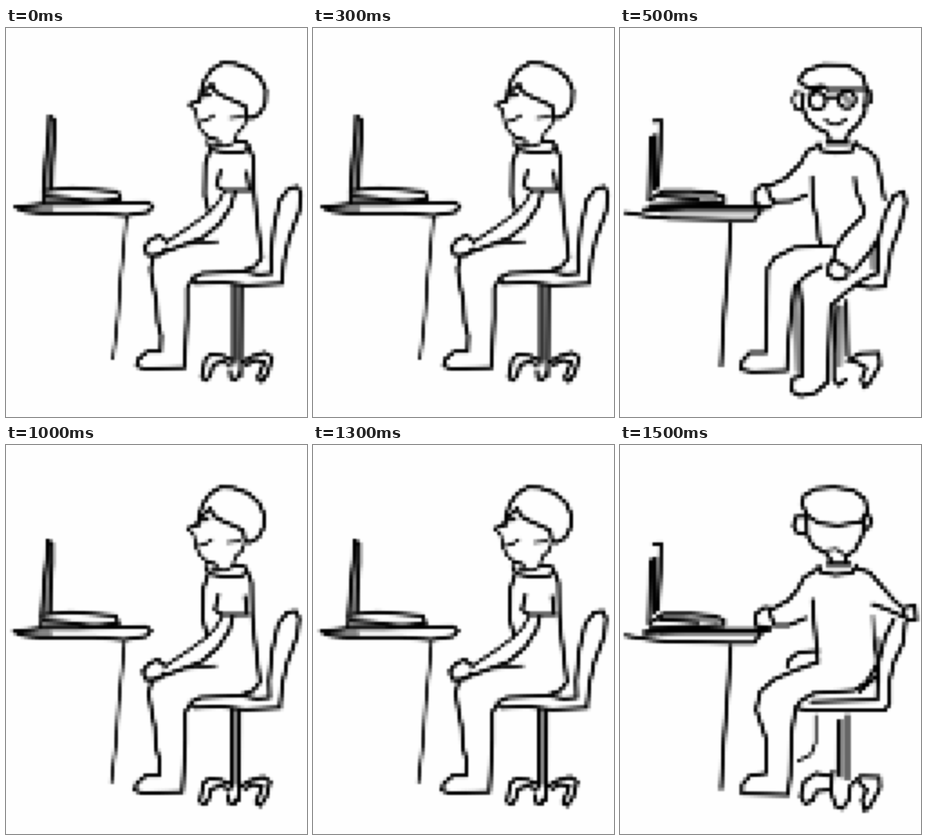
Recreate the animation shown at these times as an HTML page without scripts. Size 500x647 px, loop 2000 ms.

```html
<!DOCTYPE html>
<html lang="en">
<head>
<meta charset="utf-8">
<title>Desk sketch</title>
<style>
  html, body { margin: 0; width: 100%; height: 100%; overflow: hidden; background: #fefefe; }
  svg { display: block; width: 500px; height: 647px; }
  path, circle { fill: none; stroke: #000; stroke-width: 5.6; stroke-linecap: round; stroke-linejoin: round; }
  .thin { stroke-width: 4; }
  .bold { stroke-width: 8; }
  .shade { stroke: #0007; stroke-width: 9; }
  .frame { visibility: hidden; filter: url(#pixelate); animation: show 2s step-end infinite; }
  .second { animation-delay: -1.5s; }
  .third { animation-delay: -1s; }
  .fourth { animation-delay: -.5s; }
  @keyframes show {
    0% { visibility: visible; }
    25%, 100% { visibility: hidden; }
  }
</style>
</head>
<body>
<svg viewBox="0 0 500 647">
  <defs>
    <!-- samples the drawing on a 6px grid, then grows each sample into a cell -->
    <filter id="pixelate" filterUnits="userSpaceOnUse" x="0" y="0" width="500" height="647">
      <feFlood x="2" y="2" width="2" height="2"/>
      <feComposite x="0" y="0" width="6" height="6"/>
      <feTile result="grid"/>
      <feGaussianBlur in="SourceGraphic" stdDeviation="1.3"/>
      <feComposite in2="grid" operator="in"/>
      <feMorphology operator="dilate" radius="2"/>
      <feGaussianBlur stdDeviation=".9"/>
    </filter>

    <g id="resting">
      <g id="side-desk">
        <path class="shade" d="M74 155 69 265M25 301H75M70 286H180"/>
        <path d="M72 147 71 175 66 220 62 275M73 148 80 152 80 185 77 230 76 268"/>
        <path d="M62 271 110 266 185 272 190 284 150 291 105 283 62 280V290"/>
        <path d="M16 298 60 293 120 293 235 290 244 297 236 306 200 312 150 308 60 308 32 305Z"/>
        <path class="thin" d="M200 315 196 360 190 420 186 480 182 515 178 549"/>
      </g>
      <g id="side-head">
        <path d="M322 122 324 105 330 86 342 69 360 58 380 59 405 68 423 84 432 104 431 125 422 142 408 150 400 148"/>
        <path d="M324 108 336 100 342 93 348 106 362 114 385 124 397 130 400 148"/>
        <path d="M305 127 318 122 324 113 338 112"/>
        <path class="thin" d="M305 127 315 137 319 158 325 171 336 181 355 188M318 157 334 153 345 145M372 150 392 148M400 150 395 164 385 173 379 189"/>
        <path d="M336 182 350 186M335 191 340 202 365 207 394 206 405 200 399 190 384 188"/>
        <path class="thin" d="M344 193 365 197 384 189"/>
      </g>
      <g id="side-body">
        <path d="M338 206 331 226 330 278 337 305M405 202 411 216 412 270 416 310 421 350 425 382 414 396 394 404"/>
        <path d="M356 238 350 262 361 270 406 270M400 240 404 268"/>
        <path class="thin" d="M362 273 352 291 336 308 306 330 267 356M300 360 352 355"/>
        <path d="M380 273 374 296 355 325 327 349 270 370 242 380"/>
        <path d="M268 356 255 345 240 352 230 365 235 378 255 378 266 367"/>
        <path d="M245 382 240 401 245 432 250 456 252 490 258 512 257 538 235 538 220 551 217 562 230 567 296 565 298 535 301 480 301 432 312 415 326 408 394 405"/>
      </g>
      <g id="side-chair">
        <path class="shade" d="M384 430 384 550"/>
        <path d="M310 415 316 425 360 423 400 428 459 425"/>
        <path d="M395 405 420 410 441 408 440 380 445 331 455 286 470 267 484 264 490 276 487 305 470 350 462 386 458 424"/>
        <path d="M378 427V558M391 430 390 578"/>
        <path d="M377 553 360 545 340 543 331 551 325 581 333 586 340 576 344 560 360 555 372 560M372 570 373 582 382 585 388 575"/>
        <path d="M392 556 410 546 430 540 442 548 435 574 425 588 418 582 425 566 429 556 415 552 400 560"/>
      </g>
    </g>

    <g id="front-desk">
      <path class="shade" d="M60 180 58 262M72 276 160 283M70 304H235"/>
      <path d="M51 182 48 286M56 155 68 154 67 202 63 264M57 180 57 268"/>
      <path d="M50 286 72 271 118 271 155 274 173 281 173 290 130 292 50 295M66 280 130 285"/>
      <path class="bold" d="M42 302 110 298 246 298"/>
      <path d="M10 307 45 313 82 317 185 319 223 319 233 304"/>
      <path d="M184 325 180 390 176 440 172 490 168 561"/>
    </g>

    <g id="glasses">
      <circle cx="328" cy="121" r="14"/>
      <circle cx="377" cy="119" r="14"/>
      <path class="shade" d="M372 113 380 122"/>
      <path d="M318 106 338 99M345 115 362 115M350 102H410"/>
    </g>
  </defs>

  <g class="frame"><use href="#resting"/></g>

  <g class="frame second">
    <use href="#front-desk"/>
    <path d="M318 101 301 93 298 85 309 71 338 61 378 62 403 79 410 102M318 99 336 96 346 103"/>
    <use href="#glasses"/>
    <path class="thin" d="M305 109 291 107 286 120 292 134 305 138M410 103 418 108 417 123 405 130"/>
    <path d="M305 110 303 130 310 150 325 165 345 175 349 187M409 106 407 140 395 160 380 174 375 188"/>
    <path class="thin" d="M341 152 350 160 362 161 376 151"/>
    <path class="shade" d="M346 192H378"/>
    <path d="M330 192 335 204 358 208 385 205 391 190M344 188H378"/>
    <path d="M329 196 311 205 300 225 275 250 250 262 235 262 223 273 223 289 235 298 249 297 258 289 285 288 310 278M245 266 249 281 258 290"/>
    <path d="M319 248 320 290 328 322 330 350 334 361M392 195 410 202 425 215 432 245 439 284"/>
    <path d="M390 250 392 270 405 300 405 311 376 340 358 365 355 382 347 395 346 410 360 419 377 414 379 400 365 391 354 386"/>
    <path d="M350 362 290 365 257 382 245 400 244 460 242 540 216 540 203 554 201 568 220 572 277 570 280 520 285 470 290 430 310 411 335 396"/>
    <path d="M298 426 303 470 302 540 302 579 287 583 285 604 300 612 324 607 344 590 347 530 350 462 375 440 400 421 425 408"/>
    <path class="shade" d="M292 430 296 570M420 362 421 398M366 465 364 560"/>
    <path d="M388 405 421 365 431 345 440 310 455 279 471 272 475 290 465 330 450 370 445 402 440 430 415 432 390 427M430 348 428 408"/>
    <path d="M360 462 355 540 355 585 364 594 375 585M376 455 378 545"/>
    <path d="M378 553 400 541 430 540 432 560 415 589 406 598 401 585 409 565 395 557 380 552"/>
  </g>

  <g class="frame third"><use href="#resting" x="-3" y="12"/></g>

  <g class="frame fourth">
    <use href="#front-desk" y="10"/>
    <path d="M302 97 306 84 325 73 355 70 387 75 407 90 411 110 400 128 362 134 330 130 311 117Z"/>
    <path d="M309 119 293 119 288 134 295 147 308 148M412 115 418 127 412 139 403 138"/>
    <path d="M310 119 311 150 321 168 344 181 352 195M408 114 403 150 391 174 376 185 375 195"/>
    <path class="thin" d="M344 175 360 173 375 184"/>
    <path class="shade" d="M346 201H380"/>
    <path d="M330 201 335 212 358 216 385 213 393 200M346 197H382"/>
    <path d="M326 208 306 220 295 240 280 258 255 272 240 270 226 281 225 300 250 305M248 276 256 300 280 300 308 288"/>
    <path d="M320 258 322 290 327 338 329 360M330 342 297 345 281 357 278 368"/>
    <path d="M393 205 415 212 435 235 455 258 470 271 490 267 492 290 476 292 470 271M420 265 440 272 472 286"/>
    <path d="M329 361 290 375 256 390 233 410 226 440 235 466 243 490 243 546 216 550 203 565 203 580 279 582 283 550 285 480 291 441"/>
    <path class="shade" d="M428 325 428 395M368 460 367 550"/>
    <path d="M455 290 440 320 430 360 410 394 390 408 322 413 301 425 292 437 310 441 440 441 448 430 448 391 455 361 470 330 474 296"/>
    <path d="M432 345 426 385 398 410"/>
    <path class="thin" d="M420 285 422 330 430 372M325 450 325 495 317 515 297 525"/>
    <path d="M429 372 427 424 318 427M363 460 362 548M378 450 378 555"/>
    <path d="M350 551 326 546 306 560 300 584 308 597 321 590 326 576 345 574M354 542 350 575 358 600 369 605 380 590 382 570"/>
    <path d="M383 566 400 551 431 552 432 570 416 600 407 608 402 591 410 574 398 561"/>
  </g>
</svg>
</body>
</html>
```
